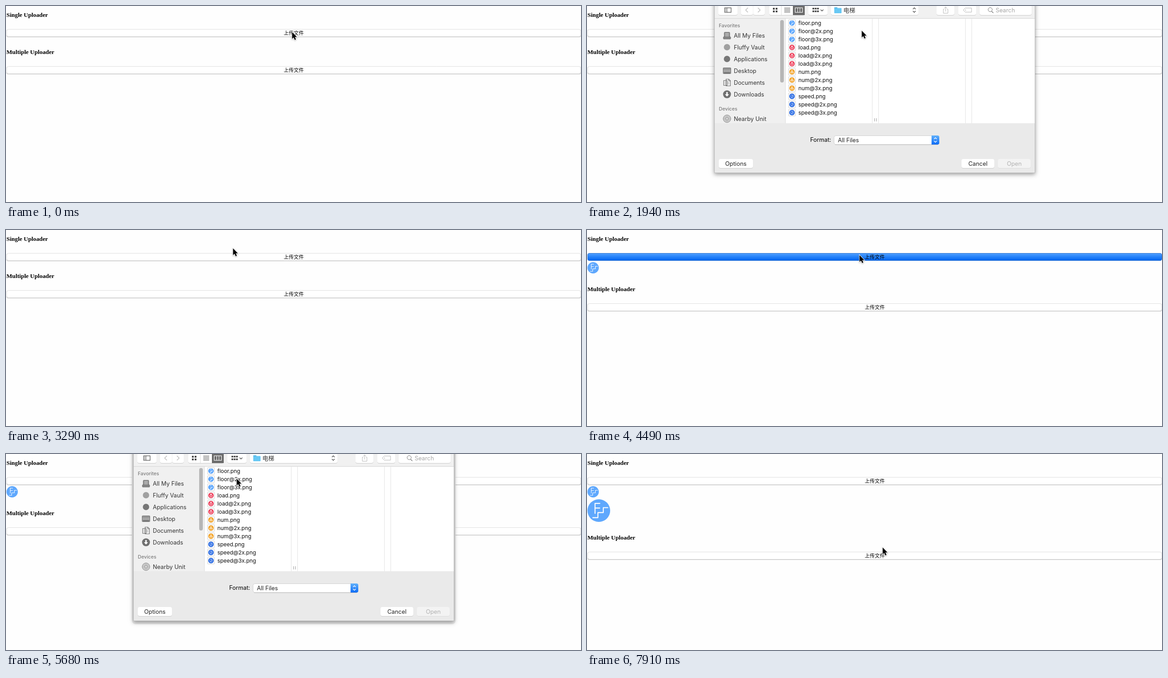
These frames come from a looping animation (1265 px wide and 433 px high, 8 s). An HTML page with a canvas:

```html
<!DOCTYPE html>
<html lang="zh">
<head>
<meta charset="utf-8">
<title>Uploader demo</title>
<style>
html, body { margin: 0; width: 100%; height: 100%; overflow: hidden; background: #fefefe; }
canvas { display: block; }
</style>
</head>
<body>
<canvas id="stage" width="1265" height="433"></canvas>
<script>
const ctx = document.getElementById('stage').getContext('2d');
const LOOP = 8000;
const UI = 'Inter, sans-serif';
const CJK = '"Noto Sans CJK SC", "Noto Sans CJK", sans-serif';
const SERIF = '"Liberation Serif", serif';
const GRAY = '#707070';

// [time, value...]: each entry holds until the next one
const SLIDE = [[0, null], [1340, -230], [1490, -92], [1640, 0], [2990, -40], [3140, -230], [3290, null],
  [4940, -230], [5090, -92], [5240, 0], [7030, -40], [7180, -230], [7330, null]];
const CURSOR = [[0, 630, 58], [1940, 605, 55], [2090, 565, 50], [2240, 527, 47], [2390, 510, 43],
  [2540, 500, 41], [3590, 530, 46], [3740, 570, 52], [3890, 600, 56], [5390, 570, 56], [5540, 530, 55],
  [5680, 508, 55], [7480, 540, 90], [7620, 585, 140], [7760, 625, 185], [7910, 651, 207]];
const FILES = [['floor', '#5fa8fb'], ['load', '#ee4560'], ['num', '#f3a42b'], ['speed', '#1f63e0']]
  .flatMap(([name, color]) => ['', '@2x', '@3x'].map(s => ({ name: name + s + '.png', kind: name, color })));
const PLACES = ['All My Files', 'Fluffy Vault', 'Applications', 'Desktop', 'Documents', 'Downloads'];

const at = (keys, t) => keys.filter(k => k[0] <= t).pop();
const within = (t, a, b) => t >= a && t < b;

function text(s, x, y, size, color = '#000', font = UI, align = 'left', weight = 400) {
  ctx.font = `${weight} ${size}px ${font}`;
  ctx.textAlign = align;
  ctx.fillStyle = color;
  ctx.fillText(s, x, y);
}

function rect(x, y, w, h, color) {
  ctx.fillStyle = color;
  ctx.fillRect(x, y, w, h);
}

function round(x, y, w, h, r, fill, stroke) {
  ctx.beginPath();
  ctx.roundRect(x, y, w, h, r);
  if (fill) { ctx.fillStyle = fill; ctx.fill(); }
  if (stroke) { ctx.strokeStyle = stroke; ctx.lineWidth = 1; ctx.stroke(); }
}

function disc(x, y, r, fill, stroke) {
  ctx.beginPath();
  ctx.arc(x, y, r, 0, 7);
  if (fill) { ctx.fillStyle = fill; ctx.fill(); }
  if (stroke) { ctx.strokeStyle = stroke; ctx.lineWidth = 1; ctx.stroke(); }
}

function line(points, color, width = 1, c = ctx) {
  c.beginPath();
  points.forEach(([x, y], i) => i ? c.lineTo(x, y) : c.moveTo(x, y));
  c.strokeStyle = color;
  c.lineWidth = width;
  c.stroke();
}

function gradient(y, h, ...colors) {
  const g = ctx.createLinearGradient(0, y, 0, y + h);
  colors.forEach((c, i) => g.addColorStop(i / (colors.length - 1), c));
  return g;
}

// Floor pictogram rendered at a native pixel size
function floorIcon(size) {
  const cv = document.createElement('canvas');
  cv.width = cv.height = size;
  const c = cv.getContext('2d');
  c.scale(size / 165, size / 165);
  c.fillStyle = '#5fa8fd';
  c.arc(82.5, 82.5, 82.5, 0, 7);
  c.fill();
  c.lineCap = c.lineJoin = 'round';
  line([[90, 30], [55, 30], [55, 103]], '#fff', 7, c);
  line([[55, 64], [89, 64]], '#fff', 7, c);
  line([[39, 134], [76, 134], [76, 97], [115, 97], [115, 61], [148, 61]], '#fff', 7, c);
  return cv;
}
const icon1 = floorIcon(25), icon2 = floorIcon(50);

function pageButton(y, pressed) {
  if (pressed) {
    round(1.5, y + .5, 1263, 16, 3.5, gradient(y, 17, '#55a2ff', '#2381fa', '#0062ee'), '#2b70cc');
  } else {
    round(1, y + 1, 1264, 17, 4, '#c9c9c9');
    round(1.5, y + .5, 1263, 16, 4, '#fff', '#dedede');
  }
  text('上传文件', 633, y + 13, 11, '#000', CJK, 'center');
}

function page(t) {
  rect(0, 0, 1265, 433, '#fefefe');
  const shift = t >= 7480 ? 83 : t >= 3590 ? 29 : 0;
  text('Single Uploader', 1, 24, 13.3, '#000', SERIF, 'left', 700);
  pageButton(51, within(t, 1050, 1640) || within(t, 4490, 5240));
  if (shift) ctx.drawImage(icon1, 1, 71);
  if (shift > 29) ctx.drawImage(icon2, 1, 100);
  text('Multiple Uploader', 1, 106 + shift, 13.3, '#000', SERIF, 'left', 700);
  pageButton(133 + shift, false);
  if (within(t, 750, 1050)) {
    round(631.5, 76.5, 88, 21, 1, '#f3f3f3', '#d2d2d2');
    text('未选择任何文件', 675.5, 91, 11, '#222', CJK, 'center');
  }
}

function button(x, y, w, h, label, on) {
  round(x, y + 1, w, h, 4, on ? '#cacaca' : '#dcdcdc');
  round(x, y, w, h, 4, on ? '#fff' : '#f3f3f3');
  if (label) text(label, x + w / 2, y + 15, 12.8, on ? '#222' : '#b1b1b1', UI, 'center');
}

function arrows(x, y, color, gap = 2, s = 3) {
  for (const d of [-1, 1])
    line([[x - s, y + d * gap], [x, y + d * (gap + s)], [x + s, y + d * gap]], color, 1.4);
}

function toolbar(on, chosen) {
  rect(281, 0, 704, 27, '#f1f1f1');
  const ink = on ? '#4c4c4c' : '#aaa', faint = '#b4b4b4';
  const tools = [[289, 42], [339, 26], [366, 25], [401, 78], [487, 42], [537, 192], [769, 39], [817, 39], [864, 114]];
  for (const [x, w] of tools) button(x, -2, w, 22, '', true);
  ctx.strokeStyle = ink;
  ctx.lineWidth = 1.2;
  ctx.strokeRect(303, 4, 14, 10);
  line([[308, 4], [308, 14]], ink);
  for (const y of [6.5, 9, 11.5]) line([[304.5, y], [306.5, y]], ink);
  line([[354, 4], [349, 9], [354, 14]], faint, 1.2);
  line([[376, 4], [381, 9], [376, 14]], faint, 1.2);
  for (const x of [409, 415]) for (const y of [4, 10]) rect(x, y, 4, 4, ink);
  line([[427.5, -2], [427.5, 20]], '#ddd');
  for (const y of [4.5, 7.5, 10.5, 13.5]) line([[434, y], [447, y]], ink);
  rect(453, 0, 26, 20, on ? '#6b6b6b' : '#bbb');
  ctx.strokeStyle = '#fff';
  ctx.lineWidth = 1.2;
  ctx.strokeRect(458, 4, 16, 10);
  for (const x of [463.5, 468.5]) line([[x, 4], [x, 14]], '#fff');
  for (const x of [496, 501, 506]) for (const y of [4, 10]) rect(x, y, 4, 3.5, ink);
  line([[514, 8], [517, 11], [520, 8]], ink, 1.4);

  round(544, 3, 7, 5, 1, '#45aee0');
  round(544, 4.5, 16, 11.5, 1, '#68c8f4');
  text('电梯', 564, 14, 13, on ? '#333' : '#aaa', CJK);
  arrows(720, 9, ink);

  const share = chosen ? '#5a5a5a' : faint;
  line([[786, 7], [784, 7], [784, 16], [794, 16], [794, 7], [792, 7]], share);
  line([[789, 12], [789, 2]], share);
  line([[786, 5], [789, 2], [792, 5]], share);
  line([[828, 9], [832, 4.5], [846, 4.5], [846, 13.5], [832, 13.5], [828, 9]], share);
  disc(833, 9, 1, share);
  disc(887, 8, 4.5, null, '#777');
  line([[890, 11.5], [894, 15.5]], '#777', 1.3);
  text('Search', 899, 14, 12.8, '#a6a6a6');
  rect(281, 27, 704, 1, '#d4d4d4');
}

function placeIcon(i, y) {
  const x = 308;
  if (i === 0) {
    round(x - 6, y - 7, 12, 11, 1, '#8a8a8a', GRAY);
    for (const d of [-4, -1, 2]) line([[x - 4, y + d], [x + 4, y + d]], '#eee');
    round(x - 8, y + 3, 16, 5, 1, '#858585', GRAY);
  } else if (i === 1) {
    disc(x, y, 7, '#a0a0a0');
  } else if (i === 2) {
    disc(x, y, 7, '#777');
  } else if (i === 3) {
    round(x - 8.5, y - 6.5, 17, 13, 1, '#a4a4a4', GRAY);
    line([[x - 8, y - 4], [x + 8, y - 4]], GRAY);
    line([[x - 7, y + 4.5], [x + 7, y + 4.5]], '#666', 2);
  } else if (i === 4) {
    round(x - 7.5, y - 4.5, 8, 11, 0, '#ddd', GRAY);
    line([[x - 2, y - 7.5], [x + 4, y - 7.5], [x + 7.5, y - 4], [x + 7.5, y + 7.5], [x - 2, y + 7.5], [x - 2, y - 8]], GRAY, 1.2);
    line([[x + 3.5, y - 7], [x + 3.5, y - 3.5], [x + 7, y - 3.5]], GRAY);
    for (const d of [0, 3]) line([[x, y + d], [x + 5, y + d]], '#999');
  } else if (i === 5) {
    disc(x, y, 8.7, GRAY);
    line([[x, y - 5], [x, y + 1]], '#fff', 3);
    ctx.fillStyle = '#fff';
    ctx.beginPath();
    ctx.moveTo(x - 4.5, y); ctx.lineTo(x + 4.5, y); ctx.lineTo(x, y + 5);
    ctx.fill();
  } else {
    disc(x, y, 8.3, '#cfcfcf', '#808080');
    disc(x, y, 5, null, '#aaa');
    disc(x, y, 2.5, '#eee', '#808080');
  }
}

function sidebar() {
  rect(281, 28, 155, 231, '#f0f0f0');
  rect(436, 28, 1, 231, '#dcdcdc');
  text('Favorites', 290, 47, 10.7, '#7d7d7d', UI, 'left', 500);
  PLACES.forEach((name, i) => {
    placeIcon(i, 65 + i * 26);
    text(name, 323, 70 + i * 26, 12.7, '#333');
  });
  text('Devices', 290, 231, 10.7, '#7d7d7d', UI, 'left', 500);
  placeIcon(6, 249);
  text('Nearby Unit', 323, 254, 12.7, '#333');
  round(425, 31, 8, 138, 4, '#b6b6b6');
}

function fileIcon(f, y) {
  const x = 451;
  round(x - 7.5, y - 7.5, 15, 15, 1, '#fff', '#cfcfcf');
  if (f.kind === 'floor') {
    ctx.drawImage(icon2, x - 6, y - 6, 12, 12);
    return;
  }
  disc(x, y, 6, f.color);
  if (f.kind === 'load') {
    round(x - 2.5, y - 1, 5, 4, 1, null, '#fff');
    disc(x, y - 2.5, 1, null, '#fff');
  } else if (f.kind === 'num') {
    for (const d of [-2, 2]) round(x + d - 1.5, y, 3, 2.5, 1, null, '#fff');
    disc(x, y - 2, 1.2, null, '#fff');
  } else {
    disc(x, y, 3.3, null, '#c9dcff');
    line([[x - 1, y + 2], [x + 2, y - 2]], '#fff');
  }
}

function browser(loaded, pick) {
  rect(437, 28, 548, 231, '#fff');
  for (const x of pick < 0 ? [627, 641, 832, 846] : [627, 641]) rect(x, 28, 1, 231, '#e1e1e1');
  for (const x of [632, 636]) rect(x, 248, 1, 7, '#999');
  if (loaded) FILES.forEach((f, i) => {
    const y = 38 + i * 18;
    if (i === pick) rect(437, y - 9, 190, 17, '#0a65da');
    fileIcon(f, y - .5);
    text(f.name, 465, y + 4, 11.9, i === pick ? '#fff' : '#111');
  });
  if (pick >= 0) {
    ctx.drawImage(pick ? icon2 : icon1, 731, 38, 165, 165);
    text(FILES[pick].name, 813, 231, 15.9, '#111', UI, 'center');
  }
}

function footer(on, pick, closing) {
  text('Format:', 537, 300, 12.8, '#000', UI, 'right');
  round(543.5, 286.5, 231, 19.5, 4, '#fff', '#cfcfcf');
  rect(546, 306, 226, 1, '#bcbcbc');
  text('All Files', 552, 301, 12.7, '#222');
  if (on) round(758, 286, 17, 20, [0, 4, 4, 0], gradient(286, 20, '#62b1fb', '#0c6cf6'));
  arrows(766.5, 296, on ? '#fff' : '#555');
  button(290, 338, 75, 20, 'Options', on);
  button(824, 338, 72, 20, 'Cancel', on);
  if (closing) {
    round(904, 353, 72, 5, [0, 0, 4, 4], '#cfcfcf');
    text('Open', 940, 353, 12.8, '#222', UI, 'center');
  } else {
    button(904, 338, 72, 20, 'Open', on && pick >= 0);
  }
}

function dialog(t) {
  const slide = at(SLIDE, t)[1];
  if (slide === null) return;
  const second = t > 4000;
  const loaded = t >= (second ? 5390 : 1790);
  const pick = within(t, 2840, 3290) ? 0 : within(t, 6880, 7330) ? 1 : -1;
  ctx.save();
  ctx.translate(0, slide);
  if (second) round(277, -300, 712, 676, 8, '#ececec');
  ctx.shadowColor = 'rgba(0,0,0,.4)';
  ctx.shadowBlur = 9;
  ctx.shadowOffsetY = 3;
  rect(280, -300, 706, 669, '#bcbcbc');
  ctx.shadowColor = 'transparent';
  rect(281, -300, 704, 668, '#eaeaea');
  toolbar(loaded, pick >= 0);
  sidebar();
  browser(loaded, pick);
  footer(loaded, pick, second && slide < 0 && pick >= 0);
  ctx.restore();
}

function cursor(t) {
  const [, x, y] = at(CURSOR, t);
  ctx.save();
  ctx.translate(x - .5, y - .5);
  ctx.beginPath();
  ctx.moveTo(0, 0);
  for (const [px, py] of [[0, 15], [3.4, 12], [5.8, 17.4], [8.4, 16.3], [6, 11], [10.6, 11]]) ctx.lineTo(px, py);
  ctx.closePath();
  ctx.shadowColor = 'rgba(0,0,0,.35)';
  ctx.shadowBlur = 3;
  ctx.shadowOffsetY = 1;
  ctx.strokeStyle = '#fff';
  ctx.lineWidth = 1.8;
  ctx.stroke();
  ctx.shadowColor = 'transparent';
  ctx.fillStyle = '#000';
  ctx.fill();
  ctx.restore();
}

const start = performance.now();
function frame() {
  const t = (performance.now() - start) % LOOP;
  page(t);
  dialog(t);
  cursor(t);
  requestAnimationFrame(frame);
}
frame();
</script>
</body>
</html>
```
